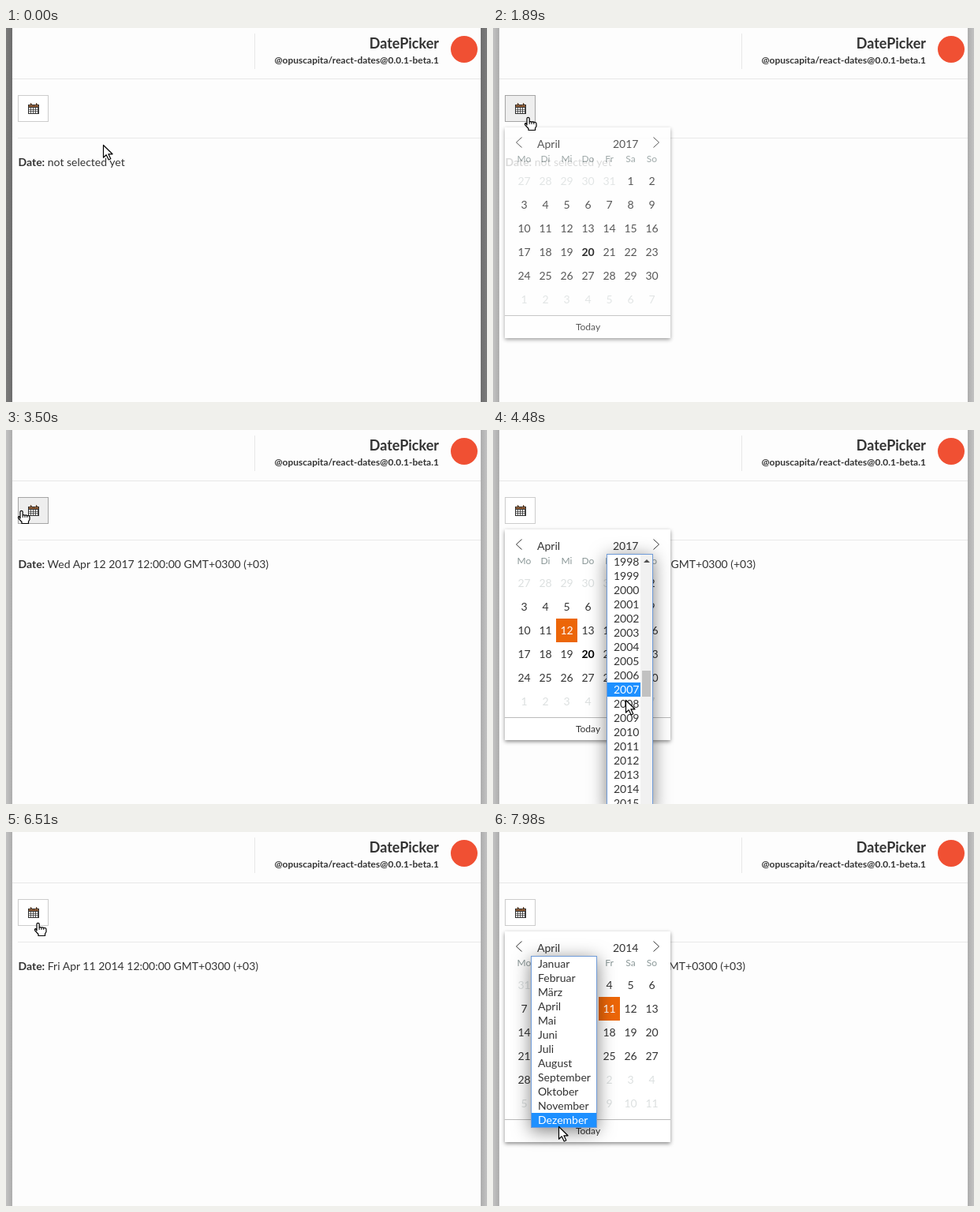
An HTML page for the animation above (8000 ms loop, 610 by 474 pixels).

```html
<!DOCTYPE html>
<html lang="en">
<head>
<meta charset="utf-8">
<title>DatePicker</title>
<style>
  html, body { margin: 0; width: 100%; height: 100%; overflow: hidden; background: #fdfdfd; }
  svg { display: block; width: 610px; height: 474px; font-family: Lato, "Open Sans", sans-serif; fill: #333; }
  text { white-space: pre; }
  rect { shape-rendering: crispEdges; }
  .card { fill: #fff; filter: drop-shadow(0 2px 2.5px rgba(0, 0, 0, .45)); }
  .menu { fill: #fff; stroke: #6f9bd8; filter: drop-shadow(0 4px 11px rgba(0, 0, 0, .5)); }
</style>
</head>
<body>
<svg id="stage" viewBox="0 0 610 474">
  <defs>
    <linearGradient id="left"><stop stop-color="#c2c2c2"/><stop offset="1" stop-color="#adadad"/></linearGradient>
    <linearGradient id="right"><stop stop-color="#adadad"/><stop offset="1" stop-color="#c2c2c2"/></linearGradient>
    <clipPath id="selects"><rect x="50" y="136" width="140" height="18"/></clipPath>
  </defs>
</svg>
<script>
const LOOP = 8000, STEP = 70, FADE = 400;
const BLUE = '#1e90ff', ORANGE = '#ec6608';
const WEEKDAYS = ['Mo', 'Di', 'Mi', 'Do', 'Fr', 'Sa', 'So'];
const MONTHS = ['Januar', 'Februar', 'März', 'April', 'Mai', 'Juni', 'Juli', 'August',
  'September', 'Oktober', 'November', 'Dezember'];
const YEARS = Array.from({ length: 18 }, (_, i) => String(1998 + i));

// Hotspot of the pointer: time, x, y
const PATH = [
  [0, 123, 148], [910, 123, 148], [980, 109, 97], [1050, 94, 45], [1190, 94, 45],
  [1330, 78, 72], [1540, 44, 113], [1890, 44, 113], [2030, 62, 172], [2310, 92, 257],
  [2800, 92, 257], [3220, 76, 129], [3500, 19, 102], [3850, 19, 102], [4130, 168, 149],
  [4200, 168, 151], [4270, 168, 180], [4340, 168, 240], [4410, 168, 325], [4480, 168, 342],
  [4900, 159, 447], [5250, 159, 447], [5320, 159, 423], [5530, 118, 262], [5670, 98, 198],
  [5880, 145, 226], [6160, 145, 226], [6510, 40, 115], [6930, 40, 115], [7210, 160, 190],
  [7280, 160, 190], [7490, 76, 150], [7560, 76, 150], [7630, 77, 180], [7910, 82, 362],
  [7980, 83, 373], [8000, 83, 373]
];

// Step tables: time, value
const BUTTON_ON = [[0, 0], [1540, 1], [2450, 0], [3430, 1], [4200, 0], [6580, 1], [7560, 0]];
const POPUP = [[0, 0], [1680, 1], [2520, 0], [3640, 1], [6090, 0], [6790, 1]];
const MENU = [[0, ''], [4200, 'year'], [5110, ''], [7560, 'month']];
const DATE = [[0, null], [2450, [2017, 12]], [5180, [2014, 1]], [6020, [2014, 11]]];

const stage = document.getElementById('stage');

function add(parent, tag, attrs, text) {
  const el = document.createElementNS('http://www.w3.org/2000/svg', tag);
  for (const k in attrs) el.setAttribute(k, attrs[k]);
  if (text !== undefined) el.textContent = text;
  parent.appendChild(el);
  return el;
}
const set = (el, attrs) => { for (const k in attrs) el.setAttribute(k, attrs[k]); };
const group = (parent, attrs) => add(parent, 'g', attrs);
const box = (parent, x, y, width, height, fill, more) =>
  add(parent, 'rect', { x, y, width, height, fill, ...more });
const label = (parent, x, y, size, str, more) =>
  add(parent, 'text', { x, y, 'font-size': size, ...more }, str);
const show = (el, on) => { el.style.display = on ? '' : 'none'; };

const entry = (table, t) => table.filter(e => e[0] <= t).pop();
const at = (table, t) => entry(table, t)[1];

function pointer(t) {
  const i = Math.max(1, PATH.findIndex(p => p[0] >= t));
  const a = PATH[i - 1], b = PATH[i];
  const p = (t - a[0]) / (b[0] - a[0]);
  return [1, 2].map(k => Math.round(a[k] + (b[k] - a[k]) * p));
}

function popupOpacity(t) {
  const [start, open] = entry(POPUP, t);
  if (open) return 1 - Math.pow(1 - Math.min(1, (t - start) / FADE), 2.3);
  return start ? Math.max(0, 1 - (t - start + STEP) / (FADE * .7)) : 0;
}

// Page
box(stage, 0, 0, 610, 474, '#fdfdfd');
box(stage, 0, 0, 8, 474, 'url(#left)');
box(stage, 602, 0, 8, 474, 'url(#right)');
const shade = group(stage, { fill: '#000' });
box(shade, 0, 0, 8, 474, '#000');
box(shade, 602, 0, 8, 474, '#000');
box(stage, 8, 64, 594, 1, '#e7e7e7');
box(stage, 315, 7, 1, 45, '#e7e7e7');
box(stage, 15, 139, 587, 1, '#e9e9e9');
label(stage, 549, 26, 18, 'DatePicker', { 'text-anchor': 'end', 'font-weight': 700 });
label(stage, 549, 45, 12, '@opuscapita/react-dates@0.0.1-beta.1', { 'text-anchor': 'end', 'font-weight': 700 });
add(stage, 'circle', { cx: 581, cy: 27, r: 17, fill: '#f05033' });

const line = label(stage, 15.5, 175, 14);
add(line, 'tspan', { 'font-weight': 700 }, 'Date:');
const dateText = add(line, 'tspan', {}, '');

// Button with calendar icon
const button = box(stage, 15.5, 85.5, 38, 33, '#fff', { stroke: '#ccc' });
const icon = group(stage, { transform: 'translate(28 95)' });
box(icon, 0, 2, 14, 12, '#333');
box(icon, 1, 3, 12, 2, '#8a5630');
for (let r = 0; r < 3; r++)
  for (let c = 0; c < 4; c++) box(icon, 1 + c * 3, 6 + r * 2.6, 2.2, 1.8, '#fff', { style: 'shape-rendering:auto' });
for (const x of [2.5, 9.5]) add(icon, 'rect', { x, y: .3, width: 2, height: 3.6, rx: .8, fill: '#333', stroke: '#d98a4a', 'stroke-width': .4 });

// Calendar popup
const popup = group(stage, {});
box(popup, 15, 126, 210, 267, '#fff', { class: 'card' });
add(popup, 'path', { d: 'M36.5 138.5L29.5 145L36.5 151.5M203.5 138.5L210.5 145L203.5 151.5', fill: 'none', stroke: '#333' });
const selects = group(popup, { 'clip-path': 'url(#selects)' });
label(selects, 56, 152, 14, 'April');
const yearText = label(selects, 152, 152, 14, '');
WEEKDAYS.forEach((d, c) =>
  label(popup, 39.5 + c * 27, 170, 12, d, { 'text-anchor': 'middle', fill: '#8b9898' }));
const hover = box(popup, 0, 0, 27, 30, '#f0f0f0');
const picked = box(popup, 0, 0, 27, 30, ORANGE);
const days = Array.from({ length: 42 }, (_, i) =>
  label(popup, 39.5 + i % 7 * 27, 199 + Math.floor(i / 7) * 30, 14, '', { 'text-anchor': 'middle' }));
box(popup, 15, 364, 210, 1, '#bbb');
label(popup, 120.5, 383, 12, 'Today', { 'text-anchor': 'middle' });

// Drop-down lists
function makeMenu(x, width, textX, barWidth, items) {
  const el = group(stage, {});
  box(el, x + .5, 157.5, width, items.length * 18 + 1, '#fff', { class: 'menu' });
  const mark = box(el, x + 1, 158, width - 1 - barWidth, 18, BLUE);
  const rows = items.map((s, i) => label(el, textX, 172 + i * 18, 14, s));
  return { el, mark, rows };
}
function markRow(menu, i) {
  show(menu.mark, i >= 0 && i < menu.rows.length);
  set(menu.mark, { y: 158 + i * 18 });
  menu.rows.forEach((r, k) => r.setAttribute('fill', k === i ? '#fff' : '#333'));
}
const menus = {
  year: makeMenu(144, 58, 153, 15, YEARS),
  month: makeMenu(48, 83, 57, 0, MONTHS)
};
box(menus.year.el, 187, 158, 15, 316, '#f1f1f1');
box(menus.year.el, 189, 305, 11, 33, '#c1c1c1');
add(menus.year.el, 'path', { d: 'M191 168h8l-4-4z', fill: '#505050' });

// Pointers
const ink = { fill: '#fff', stroke: '#000', 'stroke-width': 1.2, 'stroke-linejoin': 'round' };
const arrow = add(stage, 'path', { d: 'M.5.5V16.2L4.2 12.8L7.2 19L9.8 17.8L6.9 11.8H12Z', ...ink });
const hand = group(stage, {});
add(hand, 'path', {
  d: 'M-1 10V1.8a1.6 1.5 0 0 1 3.2 0V6q1.5-1 2.8 .3q1.6-.9 2.8 .4q3-.8 3.2 1.8V11.5L9.5 14V16.5H1V14.5L-3.3 9.8q-.8-2 1-2.2Z', ...ink
});
add(hand, 'path', { d: 'M2.2 6v3M5 6.6v2.4M7.8 7v2', stroke: '#000', fill: 'none' });

let shownMonth = '';
function fillMonth(year, day) {
  const key = year + '-' + day;
  if (key === shownMonth) return;
  shownMonth = key;
  yearText.textContent = year;
  const lead = (new Date(year, 3, 1).getDay() + 6) % 7;
  days.forEach((el, i) => {
    const d = new Date(year, 3, i - lead + 1);
    const inside = d.getMonth() === 3;
    const today = inside && year === 2017 && d.getDate() === 20;
    const chosen = inside && d.getDate() === day;
    el.textContent = d.getDate();
    set(el, {
      fill: chosen ? '#fff' : today ? '#000' : inside ? '#333' : '#dce0e0',
      'font-weight': today ? 700 : 400
    });
  });
  const cell = lead + day - 1;
  show(picked, day);
  set(picked, { x: 26 + cell % 7 * 27, y: 179 + Math.floor(cell / 7) * 30 });
}

function longDate([year, day]) {
  const name = ['Sun', 'Mon', 'Tue', 'Wed', 'Thu', 'Fri', 'Sat'][new Date(year, 3, day).getDay()];
  return ` ${name} Apr ${String(day).padStart(2, '0')} ${year} 12:00:00 GMT+0300 (+03)`;
}

const inGrid = (x, y) => x >= 26 && x < 215 && y >= 179 && y < 359;

function draw(time) {
  const t = Math.floor(time / STEP) * STEP;
  const [x, y] = pointer(t);
  const [px, py] = pointer(Math.max(0, t - STEP));
  const date = at(DATE, t), menu = at(MENU, t), on = at(BUTTON_ON, t);
  const live = at(POPUP, t) && !menu;

  shade.setAttribute('opacity', .37 * Math.min(1, Math.max(0, (1470 - t) / 280)));
  dateText.textContent = date ? longDate(date) : ' not selected yet';
  set(button, { fill: on ? '#eee' : '#fff', stroke: on ? '#a5a5a5' : '#ccc' });

  const alpha = popupOpacity(t);
  show(popup, alpha > 0);
  popup.setAttribute('opacity', alpha);
  fillMonth(date ? date[0] : 2017, date ? date[1] : 0);
  show(hover, live && inGrid(px, py));
  set(hover, { x: 26 + Math.floor((px - 26) / 27) * 27, y: 179 + Math.floor((py - 179) / 30) * 30 });

  for (const k in menus) show(menus[k].el, menu === k);
  if (menu) {
    let row = Math.floor((py - 158) / 18);
    if (row < 0 && menu === 'month') row = 3;
    markRow(menus[menu], row);
  }

  const onButton = x >= 15 && x < 54 && y >= 85 && y < 119;
  const link = onButton || (live && inGrid(x, y));
  show(hand, link);
  show(arrow, !link);
  set(link ? hand : arrow, { transform: `translate(${x} ${y})` });
}

const begin = performance.now();
function tick() {
  draw((performance.now() - begin) % LOOP);
  requestAnimationFrame(tick);
}
draw(0);
requestAnimationFrame(tick);
</script>
</body>
</html>
```
